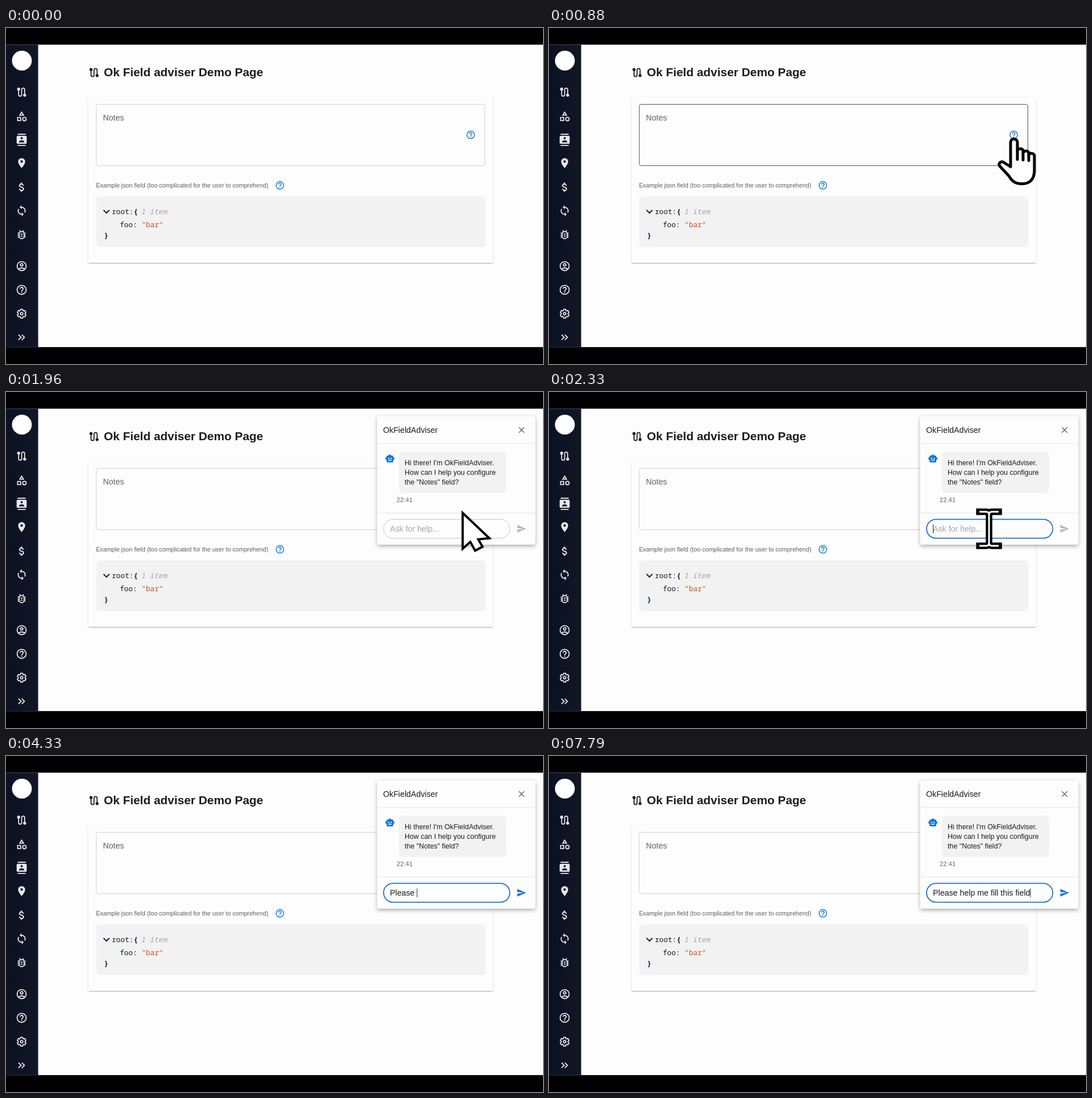
Animation, 947 px wide and 592 px high, one loop 8 s. Source, as an HTML page:

```html
<!DOCTYPE html>
<html lang="en">
<head>
<meta charset="utf-8">
<title>Field helper demo</title>
<style>
  html, body { margin: 0; width: 100%; height: 100%; overflow: hidden; background: #000; }
  svg { display: block; width: 100vw; height: 100vh; }
  text { font-family: "Liberation Sans", Arial, sans-serif; fill: #1c1c1e; white-space: pre; }
  .mono text { font-family: "Noto Sans Mono", "DejaVu Sans Mono", monospace; font-size: 12.75px; fill: #10242c; }
  .mono .brace { font-weight: 700; fill: #002b36; }
  .line { fill: none; stroke: currentColor; stroke-width: 2; }
  .fill { fill: currentColor; fill-rule: evenodd; }
  .cursor { fill: #fff; stroke: #000; stroke-width: 5; stroke-linejoin: round; stroke-linecap: round; }
</style>
</head>
<body>
<svg viewBox="0 0 947 592" preserveAspectRatio="none">
  <defs>
    <filter id="cardShadow" x="-5%" y="-5%" width="110%" height="112%">
      <feDropShadow dx="0" dy="1" stdDeviation="1" flood-color="#30306a" flood-opacity=".3"/>
    </filter>
    <filter id="panelShadow" x="-10%" y="-10%" width="120%" height="125%">
      <feDropShadow dx="0" dy="2.5" stdDeviation="3.6" flood-color="#000" flood-opacity=".33"/>
    </filter>
    <linearGradient id="side"><stop stop-color="#0a1124"/><stop offset="1" stop-color="#121726"/></linearGradient>
    <path id="beamShape" d="M-17-30H-5Q0-30 0-25V25Q0 30-5 30H-17M17-30H5Q0-30 0-25M0 25Q0 30 5 30H17"/>
  </defs>

  <rect width="947" height="592"/>
  <rect y="29.4" width="947" height="532.8" fill="#fdfdfe"/>
  <rect y="29.4" width="56.7" height="532.8" fill="url(#side)"/>
  <circle cx="28" cy="57.5" r="17.5" fill="#fff"/>
  <g id="icons"></g>

  <text x="172.5" y="85.4" font-size="20.9" font-weight="700">Ok Field adviser Demo Page</text>

  <rect x="145" y="122" width="714" height="292" rx="3.5" fill="#fdfdfd" filter="url(#cardShadow)"/>
  <path d="M147 414.3H857" stroke="#b4b4d6" stroke-width="1"/>
  <rect id="notes" x="159.2" y="134.5" width="685.3" height="108" rx="3.5" fill="none"/>
  <text x="171" y="163" font-size="14.22" style="fill:#606064">Notes</text>
  <text x="158.7" y="280.8" font-size="10.73" style="fill:#5e5e62">Example json field (too complicated for the user to comprehend)</text>
  <rect x="159" y="297" width="686" height="89" rx="7" fill="#f2f2f3"/>
  <path d="M172 320.8l5.2 5.2 5.2-5.2" fill="none" stroke="#002b36" stroke-width="2"/>
  <g class="mono">
    <text x="186.7" y="327.6">root:</text>
    <text x="225" y="327.6" class="brace">{</text>
    <text x="238" y="327.6" font-style="italic" style="fill:#a3a3a3">1 item</text>
    <text x="200.7" y="351.2">foo:</text>
    <text x="239" y="351.2" style="fill:#cb4b16">"bar"</text>
    <text x="173" y="370.2" class="brace">}</text>
  </g>
  <g id="pageIcons"></g>

  <g id="panel">
    <rect x="654.7" y="43" width="278.5" height="226" rx="3.5" fill="#fdfdfe" filter="url(#panelShadow)"/>
    <path d="M655 90.8H933M655 213.2H933" stroke="#e4e4e8"/>
    <text x="665" y="72.2" font-size="14.22">OkFieldAdviser</text>
    <rect x="693" y="105" width="189" height="73" rx="7" fill="#f2f2f3"/>
    <g font-size="12.48">
      <text x="703" y="128.6">Hi there! I'm OkFieldAdviser.</text>
      <text x="703" y="146">How can I help you configure</text>
      <text x="703" y="163.4">the "Notes" field?</text>
    </g>
    <text x="689" y="193.8" font-size="10.67" letter-spacing=".3" style="fill:#606064">22:41</text>
    <rect id="input" x="665.9" y="224.4" width="222.5" height="33.2" rx="16.5" fill="#fdfdfe"/>
    <text id="hint" x="677" y="246.2" font-size="14.22" style="fill:#a6a6aa">Ask for help...</text>
    <text id="typed" x="677" y="246.2" font-size="14.22"></text>
    <rect id="caret" y="233.5" width="1" height="15.5" fill="#222"/>
    <g id="panelIcons"></g>
  </g>

  <g id="arrow" class="cursor" style="stroke-width:4;stroke-linejoin:miter">
    <path d="M1 4V67L14.5 55 23 70.5 36 63.5 28.5 50.5 48 48.5Z"/>
  </g>
  <g id="hand" class="cursor">
    <path d="M-6 53V10a6 6 0 0112 0V25c0-5 10-5 10 0v4c0-5 10-5 10 0v4c0-5 10-5 10 1V59C36 75 28 83 14 83 2 83-4 78-9 69L-25 52c-4-6 3-10 8-6z"/>
    <path d="M6 25V40M16 29V41M26 33V42" fill="none"/>
  </g>
  <g id="beam" fill="none">
    <use href="#beamShape" stroke="#000" stroke-width="11.5" stroke-linecap="square" stroke-linejoin="miter"/>
    <use href="#beamShape" stroke="#fff" stroke-width="3"/>
  </g>
</svg>
<script>
const $ = id => document.getElementById(id);
const LOOP = 8000, BLUE = '#1976d2';

const line = d => `<path class="line" d="${d}"/>`;
const fill = d => `<path class="fill" d="${d}"/>`;
const ring = (x, y, r) => `<circle class="line" cx="${x}" cy="${y}" r="${r}"/>`;
const dot = (x, y, r) => `<circle class="fill" cx="${x}" cy="${y}" r="${r}"/>`;

function gear() {
  const pts = [];
  for (let k = 0; k < 6; k++) {
    for (const [r, a] of [[6.9, -22], [9, -13], [9, 13], [6.9, 22]]) {
      const v = (k * 60 + a) * Math.PI / 180;
      pts.push((12 + r * Math.sin(v)).toFixed(2) + ' ' + (12 - r * Math.cos(v)).toFixed(2));
    }
  }
  return line('M' + pts.join('L') + 'Z') + ring(12, 12, 2.5);
}

// Icons on a 24 unit grid
const ICON = {
  route: line('M6 7v10a3 3 0 006 0V7a3 3 0 016 0v10') + dot(6, 6, 3) + dot(18, 18, 3),
  shapes: line('M12 3.9L8.3 10h7.4zM4 14.5h6v6H4z') + ring(17.5, 17.5, 3.5),
  contacts: fill('M4 0h16v2H4zM4 22h16v2H4zM4 4h16a2 2 0 012 2v12a2 2 0 01-2 2H4a2 2 0 01-2-2V6a2 2 0 012-2z' +
    'M12 6.75a2.25 2.25 0 000 4.5 2.25 2.25 0 000-4.5zM17 17v-1.5c0-1.67-3.33-2.5-5-2.5s-5 .83-5 2.5V17z'),
  place: fill('M12 2a7 7 0 00-7 7c0 5.25 7 13 7 13s7-7.75 7-13a7 7 0 00-7-7zM12 6.5a2.5 2.5 0 010 5 2.5 2.5 0 010-5z'),
  money: line('M15.2 9c-.1-2-1.4-3.1-3.7-3.1S7.7 7.1 7.7 8.8c0 4.2 8.1 2.1 8.1 6.5 0 1.8-1.5 2.8-3.8 2.8s-4-1.2-4.1-3.2') +
    fill('M10 3h3v3h-3zM10 18h3v3h-3z'),
  sync: line('M12 5a7 7 0 016 10.5M12 19a7 7 0 01-6-10.5') + fill('M12 1v8L8 5zM12 15v8l4-4z'),
  bug: line('M12 6a5 5 0 015 5v4a5 5 0 01-10 0v-4a5 5 0 015-5zM4 9h3.5M4 13h3M4 17h3.5M16.5 9H20M17 13h3M16.5 17H20' +
    'M7.7 3.7L10 6M16.3 3.7L14 6M10 11h4M10 15h4'),
  user: ring(12, 12, 9) + ring(12, 9.5, 2.5) + line('M5.6 18.2C9 14.8 15 14.8 18.4 18.2'),
  help: ring(12, 12, 9) + line('M9 10a3 3 0 016 0c0 2-3 2.2-3 5M12 16v2'),
  gear: gear(),
  expand: line('M5.7 6.7L11 12l-5.3 5.3M12.3 6.7L17.6 12l-5.3 5.3'),
  close: line('M5.7 5.7l12.6 12.6M18.3 5.7L5.7 18.3'),
  send: fill('M2 21l21-9L2 3v7l15 2-15 2z'),
  robot: fill('M20 9V7a2 2 0 00-2-2h-3a3 3 0 00-6 0H6a2 2 0 00-2 2v2a3 3 0 000 6v4a2 2 0 002 2h12a2 2 0 002-2v-4a3 3 0 000-6z' +
    'M9 10a1.5 1.5 0 010 3 1.5 1.5 0 010-3zM15 10a1.5 1.5 0 010 3 1.5 1.5 0 010-3zM8 15h8v2H8z')
};

const icon = (name, x, y, size, color) =>
  `<g color="${color}" transform="translate(${x - size / 2} ${y - size / 2}) scale(${size / 24})">${ICON[name]}</g>`;

const SIDE = { route: 113, shapes: 155.5, contacts: 197, place: 238, money: 280.5, sync: 322,
  bug: 364, user: 419.5, help: 461.3, gear: 503.3, expand: 545 };
$('icons').innerHTML = Object.entries(SIDE).map(([n, y]) => icon(n, 27.6, y, 21.3, '#e8e8ea')).join('');
$('pageIcons').innerHTML = icon('route', 155.3, 78.5, 21.3, '#1c1c1e') +
  icon('help', 819.5, 188.2, 17.8, BLUE) + icon('help', 483, 277.2, 17.8, BLUE);
$('panelIcons').innerHTML = icon('close', 909.2, 67, 17.8, '#68686c') +
  icon('robot', 677, 117.3, 17.8, BLUE) + icon('send', 909, 241, 17.8, BLUE);
const send = $('panelIcons').lastChild;

const TEXT = 'Please help me fill this field';
const KEYS = [3080, 3220, 3340, 3460, 3600, 3780, 4000, 4480, 4700, 4830, 4950, 5080, 5200, 5320, 5420,
  5830, 6020, 6240, 6440, 6600, 6690, 6800, 6920, 7020, 7130, 7330, 7450, 7560, 7670, 7790];
const ENTER = 60, ARRIVE = 830, HOVER = 570, OPEN = 1710, LEAVE = 1800, REACH = 2200, FOCUS = 2250;

const clamp = v => Math.max(0, Math.min(1, v));
const span = (t, a, b) => clamp((t - a) / (b - a));
const show = (id, on) => $(id).setAttribute('visibility', on ? 'inherit' : 'hidden');

function pointer(t) {
  if (t < LEAVE) {
    const left = 1 - span(t, ENTER, ARRIVE);
    return [820 + 50 * left ** 6, 191.5 + 365 * left ** 2.1];
  }
  const u = span(t, LEAVE, REACH), e = u * u * (3 - 2 * u);
  return [820 - 44 * e, 191.5 + 49.5 * e];
}

function draw(t) {
  const [x, y] = pointer(t);
  const kind = t < ENTER || t >= KEYS[0] ? '' :
    t < OPEN ? (y < 199 ? 'hand' : 'arrow') : (y > 224 ? 'beam' : 'arrow');
  for (const id of ['arrow', 'hand', 'beam']) {
    show(id, id === kind);
    $(id).setAttribute('transform', `translate(${x.toFixed(2)} ${y.toFixed(2)})`);
  }

  const hover = t >= HOVER && t < OPEN;
  $('notes').setAttribute('stroke', hover ? '#515155' : '#cfd0d2');

  show('panel', t >= OPEN);
  $('panel').setAttribute('opacity', span(t, OPEN - 40, OPEN + 120));

  const focus = t >= FOCUS;
  $('input').setAttribute('stroke', focus ? '#1a70c9' : '#c6c6ca');
  $('input').setAttribute('stroke-width', focus ? 1.8 : 1);

  const count = KEYS.filter(k => k <= t).length;
  $('typed').textContent = TEXT.slice(0, count);
  show('hint', !count);
  send.setAttribute('color', count ? BLUE : '#b8b8bc');

  const last = count ? KEYS[count - 1] : FOCUS;
  show('caret', focus && (t - last) % 1000 < 500);
  $('caret').setAttribute('x', 677 + (count ? $('typed').getComputedTextLength() : 0));
}

function tick() {
  draw(performance.now() % LOOP);
  requestAnimationFrame(tick);
}
tick();
</script>
</body>
</html>
```
